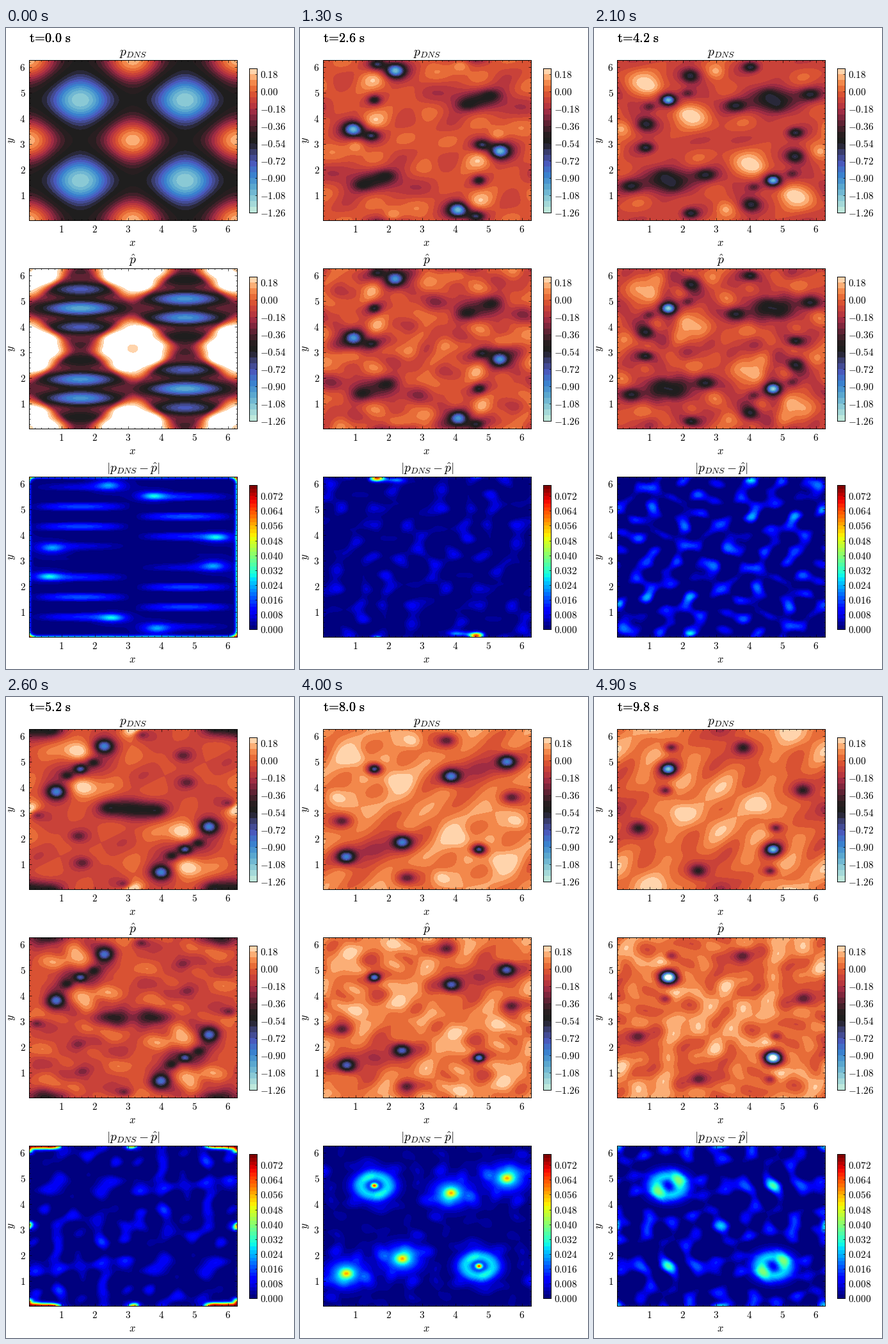
Write a matplotlib script that moves like this. It is 450x1000 px and loops after 5 s.

```python
import numpy as np
import matplotlib.pyplot as plt
from matplotlib.animation import FuncAnimation
from matplotlib.colors import BoundaryNorm, LinearSegmentedColormap, ListedColormap

W, H, DPI = 450, 1000, 100
FRAMES, STEP = 50, 0.2
PI, TAU = np.pi, 2 * np.pi
NX, NY = 128, 112
X = (np.arange(NX) + 0.5)[None, :] * TAU / NX
Y = (np.arange(NY) + 0.5)[:, None] * TAU / NY
BORDER = np.minimum(np.minimum(X, TAU - X), np.minimum(Y, TAU - Y))
RIM = np.exp(-(BORDER / 0.14) ** 2)

# Fixed points of the flow's symmetry group
MID, LOW, ORG, SIDE = (PI / 2, 1.5 * PI), (PI / 2, PI / 2), (0, 0), (PI, 0)

plt.rcParams["mathtext.fontset"] = "cm"


# ---- helpers -------------------------------------------------------------
def ease(t, start, end):
    s = np.clip((t - start) / (end - start), 0, 1)
    return s * s * (3 - 2 * s)


def wrap(d):
    return (d + PI) % TAU - PI


def shape(x, y, rx, ry):
    """Vortex profile, repeated by half-period shift and point reflection."""
    spots = {(round(a % TAU, 2) % 6.28, round(b % TAU, 2) % 6.28)
             for a, b in ((x, y), (PI - x, PI - y), (x + PI, y + PI), (-x, -y))}
    return sum((1 + (wrap(X - a) / rx) ** 2 + (wrap(Y - b) / ry) ** 2) ** -2
               for a, b in spots)


rng = np.random.default_rng(4)


def ripples(count, low, high):
    """Drifting random modes that share the symmetry, with unit variance."""
    modes = []
    while len(modes) < count:
        a, b = rng.integers(-10, 11, 2)
        if (a + b) % 2 == 0 and low <= a * a + b * b <= high:
            modes.append(np.cos(a * (X - PI / 2) + b * (Y - PI / 2)))
    modes = np.array(modes)
    phase, speed = rng.uniform(0, TAU, count), rng.uniform(0.8, 2.0, count)
    return lambda t: np.tensordot(np.cos(speed * t + phase), modes, 1) / np.sqrt(count / 4)


coarse = ripples(30, 6, 36)
fine = ripples(50, 20, 90)
speckle = ripples(60, 16, 110)


class Track:
    """A pressure dip (or rise) moving through key points t, x, y, depth."""

    def __init__(self, rx, ry, seen, *points):
        self.rx, self.ry, self.seen = rx, ry, seen
        self.keys = np.array(points).T

    def at(self, t):
        x, y, depth = (np.interp(t, self.keys[0], col) for col in self.keys[1:])
        return depth, shape(x, y, self.rx, self.ry) if depth else 0


# "seen" is the share of the dip that p-hat recovers
core = Track(.28, .26, 1, (1, *MID, 0), (4.2, *MID, 1.1), (5.2, *MID, .75),
             (6.8, *MID, 1), (9.8, *MID, 1.1))
mate = Track(.38, .37, .9, (.8, 1.8, 5.1, 0), (2.6, 2.2, 5.85, 1.08), (4.2, 2.23, 5.65, .6),
             (5.2, 2.28, 5.6, .92), (6.8, 2.98, 4.82, .9), (8, 3.87, 4.42, 1),
             (9.8, 3.82, 5.55, .5))
tail = Track(.32, .26, .95, (.8, 1.5, 3.6, 0), (2.6, 1.49, 3.32, .55), (4.2, .9, 2.85, .6),
             (5.2, .25, 2.92, .35), (6.2, -.2, 3.1, 0))
drifter = Track(.42, .32, .9, (.8, 1.5, 1.3, 0), (2.6, 1.2, 1.38, .3), (4.2, .45, 1.35, .5),
                (5.2, .74, -.06, .3), (6.8, .25, .08, .4), (7.6, .4, .3, 0))
link = Track(.27, .24, .9, (3, 2.1, 5.2, 0), (4.2, 2.14, 4.97, .33), (5.2, 1.96, 4.97, .45),
             (6.4, 1.8, 5, 0), (8.2, 1.6, 5.3, 0), (9.8, 1.65, 5.55, .5))
spot = Track(.36, .3, .95, (3, 1.8, 1.6, 0), (5.2, 1.64, 1.05, .3), (6.8, 1.94, 1.04, .48),
             (8, 2.54, .46, .42), (9.8, 2.4, .2, 0))
# Broad bright lobes and dark bands between the vortices
lobe = Track(.6, .55, .6, (1.4, 1.6, 5.5, 0), (2.6, 1.58, 5.55, -.25), (4.2, 1.1, 5.2, -.26),
             (5.2, 1.5, 5.4, -.36), (6.8, .8, 5.6, -.12), (8, .98, 5.17, -.27),
             (9.8, 1.24, 6.32, -.22))
glint = Track(.4, .42, .6, (1.4, 1.2, 2.8, 0), (2.6, 1.02, 2.95, -.3), (4.2, .14, 3.6, -.22),
              (5.2, .08, 3.2, -.28), (6.8, .6, 4, -.15), (8, .4, 3.65, -.17), (9.8, .4, 4, 0))
band = Track(.85, .55, .9, (1, *LOW, 0), (2.6, *LOW, .3), (4.2, *LOW, .45), (5.2, *LOW, 0),
             (6.8, *LOW, .14))
void = Track(.9, .5, .6, (4.2, *ORG, 0), (5.2, *ORG, .4), (6.8, *ORG, .3), (7.6, *ORG, 0))
flank = Track(.6, .7, .4, (8.4, *SIDE, 0), (9.8, *SIDE, .36))
OTHERS = (mate, tail, drifter, link, spot, lobe, glint, band, void, flank)

# Initial cellular state and its striped reconstruction
WAVE = np.cos(2 * X) + np.cos(2 * Y)
STRIPES = np.sin(X) * np.sin(Y) * np.cos(8 * Y)
P_START = -.49 + .65 * np.sign(WAVE) * np.abs(WAVE / 2) ** 1.4
HAT_START = (-.36 + .75 * np.tanh(1.5 * np.maximum(WAVE, 0)) + .2 * np.minimum(WAVE, 0)
             + .25 * STRIPES - .2 * shape(*ORG, .4, .4))
CORNER = np.exp(-(wrap(X) ** 2 + wrap(Y) ** 2) / 0.02)
ERR_START = (.017 * np.maximum(STRIPES, 0) + .024 * shape(.62, 2.38, .5, .2)
             + .02 * shape(.72, 3.48, .5, .25) + .05 * CORNER
             + .035 * np.exp(-(BORDER / .06) ** 2))


def fields(i):
    t = i * STEP
    settled = ease(t, 0, 2.4)
    late = ease(t, 6.8, 8)
    base = -.04 + .11 * ease(t, 5.4, 6.6)
    flow = base + .05 * coarse(t)
    p = P_START + settled * (flow - P_START)
    hat = HAT_START + settled * (flow + .04 * fine(t) - HAT_START)

    noise = (.004 + .0035 * np.cos(TAU * (t - 4.2) / 5.6)) * np.maximum(speckle(t), 0)
    for track in OTHERS:
        depth, s = track.at(t)
        p -= depth * s
        hat -= depth * track.seen * s
        if track is band:
            noise *= 1 + 4 * depth * s

    depth, s = core.at(t)
    p -= depth * s
    hat -= depth * (1 + .28 * ease(t, 5.5, 6.8)) * s

    err = settled * (.0008 + noise)
    err += settled * RIM * .3 * np.maximum(np.abs(p - base) - .18, 0)
    err += (1 - settled) * ERR_START
    if late:
        # Rings around the fixed core, a passing glow around its mates
        pulse = np.exp(-((t - 8) / .8) ** 2)
        q = s ** -.5 - 1
        err += .026 * late * q / 2 * np.exp(1 - q / 2) + .08 * pulse * np.exp(-9 * q)
        q = mate.at(t)[1] ** -.5 - 1
        err += pulse * (.028 * np.exp(-q / 2) + .03 * np.exp(-6 * q))
    return np.clip(p, -1.255, .235), hat, np.clip(err, .0001, .0775)


# ---- figure --------------------------------------------------------------
ICE = [(0, "#bde7db"), (.08, "#8ccad6"), (.16, "#5caad0"), (.25, "#3a82cf"), (.33, "#4a5bc0"),
       (.4, "#40437f"), (.47, "#25242c"), (.5, "#1f1e1e"), (.55, "#2a1f21"), (.62, "#5a2232"),
       (.7, "#9a2a44"), (.77, "#c13b3d"), (.84, "#db5433"), (.9, "#ef7a3c"), (.95, "#fba468"),
       (1, "#ffd4ac")]


def banded(cmap, levels):
    n = len(levels) - 1
    bands = ListedColormap(cmap(np.linspace(0, 1, n)))
    bands.set_under("white")
    bands.set_over("white")
    return dict(cmap=bands, norm=BoundaryNorm(levels, n), origin="lower", aspect="auto")


P_LEVELS = -1.26 + 0.06 * np.arange(26)
E_LEVELS = 0.002 * np.arange(40)
P_STYLE = banded(LinearSegmentedColormap.from_list("ice", ICE), P_LEVELS)
E_STYLE = banded(plt.get_cmap("jet"), E_LEVELS)

fig = plt.figure(figsize=(W / DPI, H / DPI), dpi=DPI, facecolor="white")


def box(x, y, w, h):
    return fig.add_axes([x / W, 1 - (y + h) / H, w / W, h / H])


def put(x, y, text, size, **kw):
    return fig.text(x / W, 1 - y / H, text, fontsize=size, **kw)


def panel(top, title, style, levels, stride, digits):
    ax = box(36, top, 325, 250)
    img = ax.imshow(np.zeros((NY, NX)), extent=(0, TAU, 0, TAU),
                    interpolation="bicubic", **style)
    ax.set(xlim=(.03, 6.27), ylim=(.015, TAU - .015))
    whole, minor = np.arange(1, 7), np.arange(.2, 6.3, .2)
    labels = [f"${n}$" for n in whole]
    ax.set_xticks(whole, labels)
    ax.set_yticks(whole, labels)
    ax.set_xticks(minor, minor=True)
    ax.set_yticks(minor, minor=True)
    ax.tick_params(which="both", direction="in", top=True, right=True, width=.5)
    ax.tick_params(which="major", length=3, labelsize=11)
    ax.tick_params(which="minor", length=1.5)
    ax.tick_params(axis="x", pad=5)
    ax.tick_params(axis="y", pad=4)

    put(198.5, top - 7, title, 14, ha="center", va="baseline")
    put(197, top + 290, "$x$", 12, ha="center", va="baseline")
    put(8, top + 125, "$y$", 12, ha="center", va="center", rotation=90)

    bar = box(380, top + 13, 12, 225)
    mids = (levels[:-1] + levels[1:]) / 2
    bar.imshow(mids[:, None], extent=(0, 1, levels[0], levels[-1]),
               interpolation="nearest", **style)
    marks = levels[::stride]
    bar.set_xticks([])
    bar.set_yticks(marks, [f"${round(v, 3) + 0.0:.{digits}f}$" for v in marks])
    bar.tick_params(axis="y", direction="in", left=False, right=True, labelleft=False,
                    labelright=True, length=2.5, width=.5, pad=3.5, labelsize=11)
    for spine in (*ax.spines.values(), *bar.spines.values()):
        spine.set_linewidth(.7)
    return img


images = [panel(50, r"$p_{DNS}$", P_STYLE, P_LEVELS, 3, 2),
          panel(375, r"$\hat{p}$", P_STYLE, P_LEVELS, 3, 2),
          panel(700, r"$|p_{DNS}-\hat{p}|$", E_STYLE, E_LEVELS, 4, 3)]
# Stacked text gives the clock its heavier stroke
clock = [put(36, 22, "", 14.5, va="baseline") for _ in range(3)]


def update(i):
    for img, data in zip(images, fields(i)):
        img.set_data(data)
    for label in clock:
        label.set_text(rf"$\mathrm{{t\!=\!{i * STEP:.1f}\,\,s}}$")
    return images + clock


anim = FuncAnimation(fig, update, frames=FRAMES, interval=100, repeat=True, blit=False)
plt.show()
```
